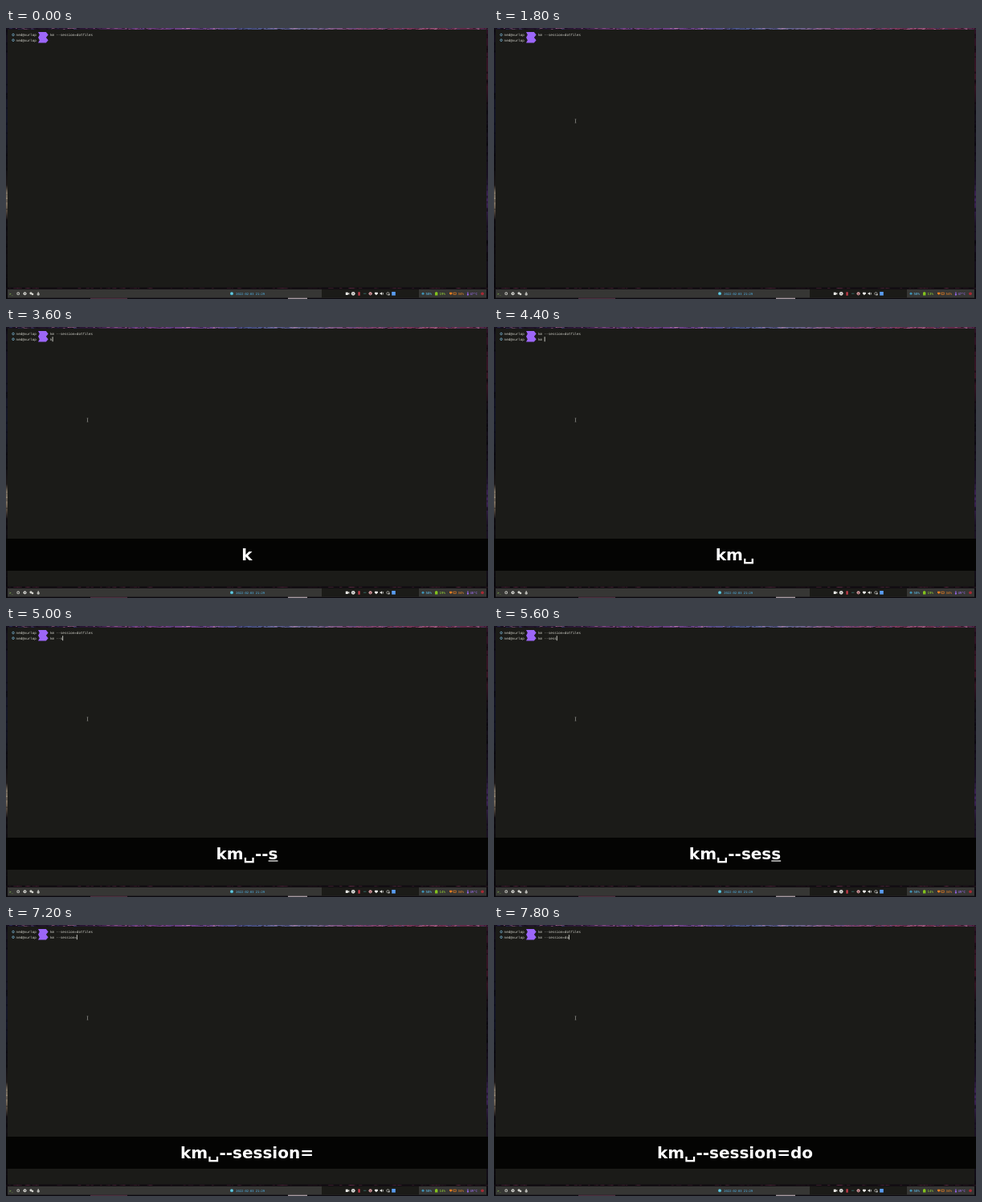
Write an HTML page with a canvas that moves like this. It is 600 by 338 pixels and loops after 8000 ms.

```html
<!DOCTYPE html>
<html lang="en">
<head>
<meta charset="utf-8">
<title>Terminal session</title>
<style>
  html, body { margin: 0; width: 100%; height: 100%; overflow: hidden; background: #1b1b18; }
  canvas { display: block; width: 100vw; height: 100vh; }
</style>
</head>
<body>
<canvas id="stage" width="600" height="338"></canvas>
<script>
const W = 600, H = 338, LOOP = 8000, STEP = 200;
const CHAR = 2.52, CMD_X = 55;
const MONO = '"DejaVu Sans Mono", "Noto Sans Mono", monospace';
const SANS = '"DejaVu Sans", "Open Sans", sans-serif';
const TERM = '#1b1b18', TEXT = '#d4d4cc';

const KEYS = 'km --session=do';
const PRESSED = [3385, 3700, 4150, 4550, 4750, 4950, 5150, 5350, 5540, 5720, 5800, 5950, 7000, 7380, 7600];
const ECHO = 40;

const stage = document.getElementById('stage').getContext('2d');
const back = document.createElement('canvas');
back.width = W;
back.height = H;

function rect(c, x, y, w, h, color) {
  c.fillStyle = color;
  c.fillRect(x, y, w, h);
}

function disc(c, x, y, r, color) {
  c.fillStyle = color;
  c.beginPath();
  c.arc(x, y, r, 0, Math.PI * 2);
  c.fill();
}

function ring(c, x, y, r, color, width = 0.8) {
  c.strokeStyle = color;
  c.lineWidth = width;
  c.beginPath();
  c.arc(x, y, r, 0, Math.PI * 2);
  c.stroke();
}

function poly(c, color, points) {
  c.fillStyle = color;
  c.beginPath();
  points.forEach(([x, y]) => c.lineTo(x, y));
  c.closePath();
  c.fill();
}

function gradient(c, x0, y0, x1, y1, stops) {
  const g = c.createLinearGradient(x0, y0, x1, y1);
  stops.forEach(([at, color]) => g.addColorStop(at, color));
  return g;
}

// Drawn large and scaled down so tiny glyphs keep fractional advances.
function label(c, text, x, y, size, color) {
  c.save();
  c.translate(x, y);
  c.scale(0.1, 0.1);
  c.textRendering = 'geometricPrecision';
  c.font = `${size * 10}px ${MONO}`;
  c.fillStyle = color;
  c.fillText(text, 0, 0);
  c.restore();
}

function seeded(seed) {
  return () => (seed = (seed * 16807) % 2147483647) / 2147483647;
}

function drawWallpaper(c) {
  rect(c, 0, 0, W, H, '#0c0a10');
  rect(c, 0, 0, W, 2, gradient(c, 0, 0, W, 0, [
    [0, '#1a1222'], [0.17, '#2a1735'], [0.26, '#6d3a78'], [0.42, '#6a4387'],
    [0.5, '#4a5488'], [0.62, '#66648c'], [0.72, '#824a78'], [0.85, '#7a3558'], [1, '#51233f']
  ]));
  rect(c, 0, 0, 2, H, gradient(c, 0, 0, 0, H, [
    [0, '#140f1c'], [0.35, '#121427'], [0.5, '#0b0a10'], [0.58, '#1d1919'],
    [0.62, '#9c8f7c'], [0.67, '#5c5145'], [0.71, '#100d12'], [1, '#0b090d']
  ]));
  rect(c, 598, 0, 2, H, gradient(c, 598, 0, 598, H, [
    [0, '#2b1224'], [0.2, '#3a1424'], [0.3, '#120d16'], [0.55, '#181021'],
    [0.63, '#42265e'], [0.72, '#1c1226'], [1, '#0d0a10']
  ]));
  rect(c, 0, 323.5, W, 2.5, '#120d12');

  const rnd = seeded(77);
  const tones = ['#0b0810', '#1b1020', '#c583a8', '#3a4378'];
  for (let i = 0; i < 260; i++) {
    const x = rnd() * W;
    c.globalAlpha = 0.15 + rnd() * 0.45;
    rect(c, x, Math.floor(rnd() * 2), 1 + rnd() * 4, 1, tones[Math.floor(rnd() * tones.length)]);
  }
  for (let i = 0; i < 90; i++) {
    c.globalAlpha = 0.1 + rnd() * 0.3;
    rect(c, rnd() * W, 324, 2 + rnd() * 5, 1, '#70344e');
  }
  for (let i = 0; i < 80; i++) {
    c.globalAlpha = 0.2 + rnd() * 0.3;
    rect(c, rnd() < 0.5 ? 0 : 598, rnd() * H, 2, 1 + rnd() * 4, '#07060a');
  }
  c.globalAlpha = 1;
}

function drawPrompt(c, y) {
  ring(c, 9, y, 1.3, '#6fa3bd', 0.9);
  label(c, 'ned@vurlop', 12.6, y + 1.4, 4.2, TEXT);
  poly(c, '#9c66f8', [[40, y - 3.4], [49.8, y - 3.4], [52.6, y], [49.8, y + 3.4], [40, y + 3.4], [41.8, y]]);
}

function drawBar(c) {
  rect(c, 2, 326, 596, 10.6, '#363634');
  rect(c, 393, 326, 121, 10.6, TERM);
  // Bright spots of the wallpaper under the bar.
  rect(c, 105, 336.6, 46, 1.4, '#4d3040');
  rect(c, 351, 336.6, 24, 1.4, '#a79aa0');
  const y = 331.3;

  label(c, '>_', 4, y + 1.3, 4.2, '#9bdc58');
  ring(c, 15.2, y, 1.4, '#b5b5b0', 1.1);
  disc(c, 23.5, y, 2, '#d3d3ce');
  disc(c, 23.7, y, 0.7, '#454543');
  disc(c, 31, y - 0.5, 1.6, '#d3d3ce');
  disc(c, 33, y + 0.7, 1.3, '#d3d3ce');
  disc(c, 40.2, y + 0.7, 1.7, '#b9b9b4');
  rect(c, 39.6, y - 2.2, 1.2, 2, '#b9b9b4');

  disc(c, 281, y, 2, '#4bbbd3');
  rect(c, 280.7, y - 1.2, 0.6, 1.5, '#ddf4f8');
  label(c, '2022-02-03 21:29', 286.3, y + 1.4, 3.7, '#52bdf5');

  rect(c, 422.8, y - 1.6, 3, 3.3, '#f0f0ec');
  poly(c, '#f0f0ec', [[425.6, y], [427.3, y - 1.4], [427.3, y + 1.4]]);
  disc(c, 432.2, y, 2.4, '#d9d9d6');
  disc(c, 432.2, y, 0.8, '#777775');
  rect(c, 438.4, y - 2, 2.3, 4.4, '#c63d49');
  rect(c, 445, y - 0.6, 3.4, 1.2, '#2f5550');
  disc(c, 453.6, y, 2.1, '#d29a9f');
  disc(c, 453.6, y + 0.4, 0.8, '#6b3539');
  poly(c, '#f0f0ec', [[459, y - 1.5], [462.8, y - 1.5], [462.8, y], [460.9, y + 2], [459, y]]);
  poly(c, '#e8e8e4', [[465.6, y - 0.8], [466.6, y - 0.8], [468.1, y - 2], [468.1, y + 2], [466.6, y + 0.8], [465.6, y + 0.8]]);
  rect(c, 468.8, y - 1.2, 0.8, 2.4, '#e8e8e4');
  ring(c, 475.4, y, 1.6, '#b7b7b3');
  disc(c, 476.8, y + 1.3, 0.9, '#d9d9d6');
  rect(c, 480.2, y - 2.3, 4.6, 4.6, '#5a9df2');

  disc(c, 519, y, 1.5, '#3e94b8');
  label(c, '50%', 522.6, y + 1.4, 4.1, '#62c6f5');
  rect(c, 534, y - 1.6, 3.4, 3.8, '#82c21c');
  rect(c, 535, y - 2.2, 1.4, 0.8, '#82c21c');
  poly(c, '#e07a20', [[552, y - 1.5], [555.4, y - 1.5], [555.4, y], [553.7, y + 1.8], [552, y]]);
  c.strokeStyle = '#e07a20';
  c.lineWidth = 0.7;
  c.strokeRect(557, y - 1.2, 3.2, 2.4);
  rect(c, 574.4, y - 2, 1, 3, '#9866f0');
  disc(c, 574.9, y + 1.3, 1.1, '#9866f0');
  disc(c, 593, y, 1.9, '#a62935');
}

function drawBack() {
  const c = back.getContext('2d');
  drawWallpaper(c);
  rect(c, 2, 2, 596, 321.5, TERM);
  drawPrompt(c, 8.5);
  drawPrompt(c, 15.2);
  label(c, 'km --session=dotfiles', CMD_X, 9.9, 4.2, TEXT);
  drawBar(c);
}

function drawReadings(c, t) {
  const y = 332.7;
  const cpu = t < 1000 ? 19 : t < 2600 ? 13 : t < 5000 ? 19 : 14;
  const disk = t >= 1000 && t < 2600 ? 54 : 34;
  const temp = t < 2600 ? 47 : t < 3800 ? 48 : 49;
  label(c, cpu + '%', 539.6, y, 4.1, '#9cdd33');
  label(c, disk + '%', 562.6, y, 4.1, '#f08a28');
  label(c, temp + '°C', 577.4, y, 4, '#a673ff');
}

function drawPointer(c) {
  const color = '#8d8d88';
  rect(c, 101.1, 113.8, 0.8, 4.4, color);
  rect(c, 100.6, 113.6, 1.8, 0.5, color);
  rect(c, 100.6, 117.9, 1.8, 0.5, color);
}

function cursorOn(t, last) {
  if (last !== undefined) return (t - last) % 1000 < 560;
  const phase = t % 1000;
  return phase >= 200 && phase < 700;
}

function drawCommand(c, t) {
  const echoed = PRESSED.filter(p => p + ECHO <= t);
  const n = echoed.length;
  label(c, KEYS.slice(0, n), CMD_X, 16.6, 4.2, TEXT);
  if (cursorOn(t, echoed[n - 1])) rect(c, CMD_X + n * CHAR + 0.1, 12.2, 0.9, 6, '#d6d6d0');
}

function drawKeys(c, t) {
  const n = PRESSED.filter(p => p <= t).length;
  if (!n) return;
  const text = KEYS.slice(0, n).replace(/ /g, '\u2423');
  c.save();
  c.globalAlpha = Math.min(1, (t - 3385) / 215);
  rect(c, 0, 264, W, 40, '#040403');
  c.font = `bold 20px ${SANS}`;
  c.fillStyle = '#fff';
  const width = c.measureText(text).width;
  const x = (W - width) / 2;
  c.fillText(text, x, 291);
  if (t > 3400 && t - PRESSED[n - 1] < 100) {
    const before = c.measureText(text.slice(0, -1)).width;
    rect(c, x + before, 292.4, width - before, 1.2, '#fff');
  }
  c.restore();
}

function draw(now) {
  const t = Math.floor((now % LOOP) / STEP) * STEP;
  stage.drawImage(back, 0, 0);
  drawReadings(stage, t);
  if (t >= 600) drawPointer(stage);
  drawCommand(stage, t);
  drawKeys(stage, t);
}

const start = performance.now();
function tick() {
  draw(performance.now() - start);
  requestAnimationFrame(tick);
}

drawBack();
tick();
</script>
</body>
</html>
```
